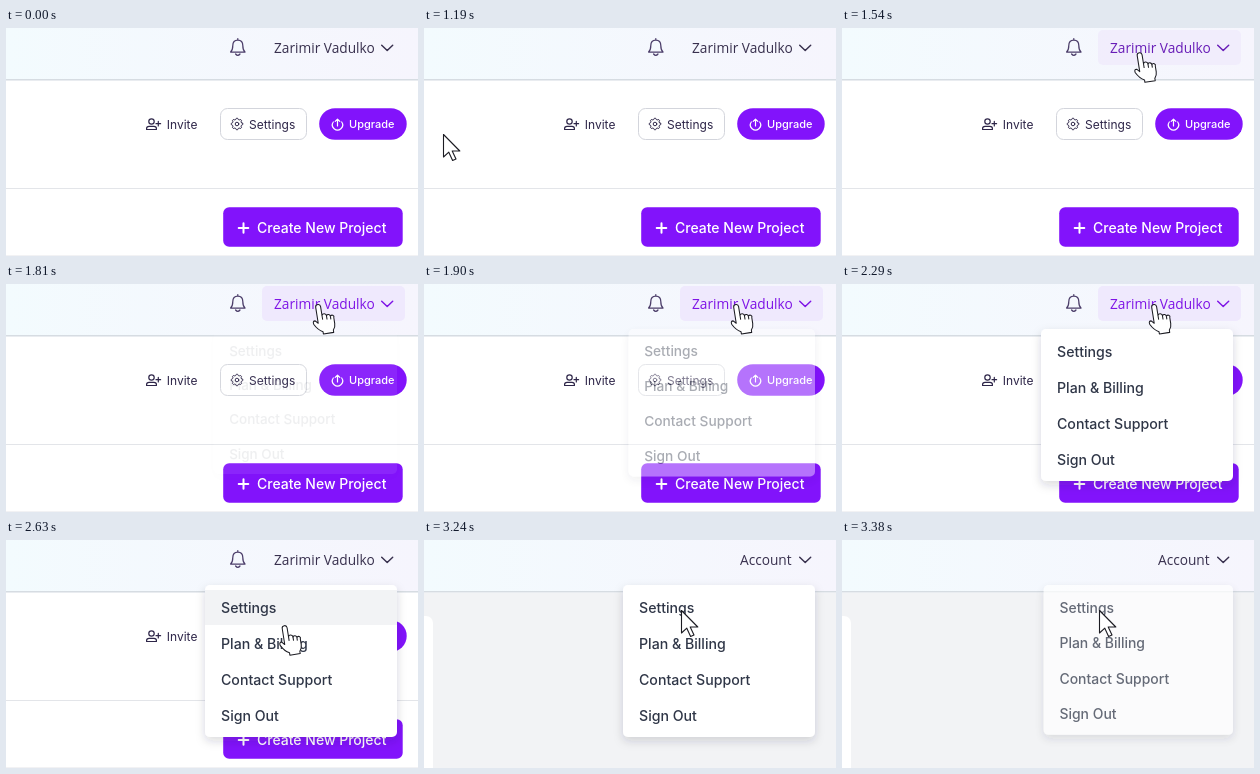
An HTML page that plays this animation: 412x228 px, repeating every 3.45 s.

```html
<!DOCTYPE html>
<html lang="en">
<head>
<meta charset="utf-8">
<title>Account menu</title>
<style>
  html, body { margin: 0; width: 100%; height: 100%; overflow: hidden; background: #fff; }
  svg { display: block; width: 412px; height: 228px; }
  text { font-family: Inter, Roboto, sans-serif; }
  .small { font-size: 12px; font-weight: 400; fill: #2d2548; }
  .strong { font-size: 14px; font-weight: 500; }
  #items { font-size: 14.15px; font-weight: 530; }
  .account { font-family: "Open Sans", "Noto Sans", sans-serif; font-size: 13.7px; }
  .line { fill: none; stroke-linecap: round; stroke-linejoin: round; }
</style>
</head>
<body>
<svg viewBox="0 0 412 228">
  <defs>
    <linearGradient id="sky">
      <stop offset="0" stop-color="#f3fbfe"/>
      <stop offset="1" stop-color="#f6f5fd"/>
    </linearGradient>
    <filter id="lift" x="-15%" y="-15%" width="130%" height="135%">
      <feDropShadow dx="0" dy="4" stdDeviation="5" flood-color="#1f2937" flood-opacity=".17"/>
    </filter>
  </defs>

  <g id="projectPage">
    <rect width="412" height="228" fill="#fff"/>
    <path d="M0 160.5H412" stroke="#e3e5e9"/>
    <path d="M0 227.5H412" stroke="#f2f2f4"/>
    <g class="line" stroke="#2d2548" stroke-width="1.2">
      <circle cx="145.5" cy="93.5" r="2.7"/>
      <path d="M140.6 101.5V100.5Q140.6 98.4 143 98.4H148Q150.4 98.4 150.4 100.5V101.5ZM152.3 93.4V98M150 95.7H154.6"/>
    </g>
    <text class="small" x="160.8" y="101">Invite</text>
    <rect x="214.5" y="80.5" width="86" height="31" rx="7" fill="#fff" stroke="#d3d5dc"/>
    <g class="line" stroke="#2d2548" stroke-width="1">
      <path id="gear"/>
      <circle cx="231" cy="96" r="1.8"/>
    </g>
    <text class="small" x="243" y="101">Settings</text>
    <rect x="313.2" y="80.2" width="87.5" height="31.6" rx="15.8" fill="#8213fb"/>
    <path class="line" stroke="#fff" stroke-width="1.2"
      d="M327.3 94A5.1 5.1 0 1 0 335.7 94M331.5 98V91.2M329.2 93.4L331.5 91.1L333.8 93.4"/>
    <text x="343" y="100" font-size="11" font-weight="500" fill="#fff">Upgrade</text>
    <rect x="217.2" y="179.2" width="179.5" height="39.5" rx="6" fill="#8213fb"/>
    <path d="M232.7 200H242.3M237.5 195.2V204.8" stroke="#fff" stroke-width="2" stroke-linecap="round"/>
    <text class="strong" x="251" y="205" fill="#fff">Create New Project</text>
  </g>

  <g id="accountPage">
    <rect width="412" height="228" fill="#f2f3f5"/>
    <rect x="-20" y="76" width="29" height="170" rx="7" fill="#fff"/>
  </g>

  <rect y="51" width="412" height="2" fill="#e9ecf0"/>
  <rect width="412" height="51" fill="url(#sky)"/>
  <path d="M0 51.5H412" stroke="#d6dce2"/>
  <path id="bell" class="line" stroke="#4b3d69" stroke-width="1.25"
    d="M224.6 24Q226.8 22 226.8 17.5Q226.8 12 231.8 12Q236.8 12 236.8 17.5Q236.8 22 239 24ZM231.8 12V10.6M229.6 26Q231.8 28.8 234 26"/>
  <rect id="buttonGlow" x="256" y="2" width="143" height="35" rx="5" fill="#efe9fd"/>
  <text id="label" class="account" y="25"></text>
  <path id="chevron" class="line" stroke-width="1.45" d="M375.7 17.2L381.2 22.6L386.7 17.2"/>

  <g id="menu">
    <rect x="199" y="45" width="192" height="152" rx="5" fill="#fff" filter="url(#lift)"/>
    <rect id="rowGlow" x="199" y="50" width="192" height="35" fill="#f2f3f5"/>
    <g id="items" fill="#2f3647"></g>
  </g>

  <g id="cursor" fill="#fff" stroke="#1b1b22" stroke-width="1.1" stroke-linejoin="round">
    <path id="arrow" d="M.5 .5V23L5.8 18.2L9.6 26.4L13 24.9L9.2 17H16.8Z"/>
    <g id="hand" transform="translate(-1 2) rotate(-9) scale(.95)">
      <path d="M-2.6 1A2.6 2.6 0 0 1 2.6 1V10.5A2.4 2.4 0 0 1 7.2 11.5A2.2 2.2 0 0 1 11.2 12.8A1.9 1.9 0 0 1 14.5 14.8V21Q14.5 25 12 27.5V30H1V27.5Q-4 25 -7.5 18.2Q-8.2 14.6 -5.4 15L-2.6 18Z"/>
      <path fill="none" d="M2.6 10.5V15M7.2 11.5V15.5M11.2 12.8V16"/>
    </g>
  </g>
</svg>
<script>
const LOOP = 3450;
const el = id => document.getElementById(id);
const clamp = v => Math.min(1, Math.max(0, v));
const ramp = (t, from, to) => clamp((t - from) / (to - from));
const smooth = u => u * u * (3 - 2 * u);
const mix = (a, b, u) => a + (b - a) * u;
const show = (id, on) => el(id).setAttribute('display', on ? 'inline' : 'none');
const fade = (id, v) => el(id).setAttribute('opacity', v);
const mixColor = (a, b, u) => `rgb(${a.map((v, i) => Math.round(mix(v, b[i], u)))})`;

// The screen updates in bursts, with still holds between them.
const burst = start => Array.from({ length: 8 }, (_, i) => start + 70 * i);
const ticks = [0, ...burst(1190), 1810, 1900, 1980, 2040, 2090, 2160, 2230, 2290,
  ...burst(2350), 3240, 3310, 3380];

const INK = [56, 48, 78], PURPLE = [126, 20, 230];
const START = [19, 106], BUTTON = [313, 20], BEND = [286, 118], ROW = [257, 70];

['Settings', 'Plan & Billing', 'Contact Support', 'Sign Out'].forEach((name, i) => {
  const item = document.createElementNS('http://www.w3.org/2000/svg', 'text');
  item.setAttribute('x', 215);
  item.setAttribute('y', 73 + 36 * i);
  item.textContent = name;
  el('items').append(item);
});

const teeth = Array.from({ length: 32 }, (_, i) => {
  const r = i % 4 < 2 ? 5.8 : 4.6, a = (i - .5) * Math.PI / 16;
  return `${(231 + r * Math.cos(a)).toFixed(2)} ${(96 + r * Math.sin(a)).toFixed(2)}`;
});
el('gear').setAttribute('d', `M${teeth.join('L')}Z`);

function cursorAt(t) {
  if (t < 2350) {
    const u = 1 - (1 - ramp(t, 1190, 1680)) ** 2.4;
    return START.map((v, i) => mix(v, BUTTON[i], u));
  }
  const s = smooth(ramp(t, 2350, 2840));
  return BUTTON.map((v, i) => mix(mix(v, BEND[i], s), mix(BEND[i], ROW[i], s), s));
}

function menuAt(t) {
  if (t < 1810) return 0;
  if (t < 3240) return .5 - .5 * Math.cos(Math.PI * ramp(t, 1750, 2090));
  return 1 - .28 * ramp(t, 3240, 3380) ** 1.5;
}

function render(time) {
  const t = ticks.findLast(tick => tick <= time);
  const leaving = t >= 3240;
  show('projectPage', !leaving);
  show('bell', !leaving);
  show('accountPage', leaving);

  const hover = ramp(t, 1430, 1590) * (1 - ramp(t, 2420, 2600));
  const color = mixColor(INK, PURPLE, hover);
  fade('buttonGlow', hover);
  el('label').textContent = leaving ? 'Account' : 'Zarimir Vadulko';
  el('label').setAttribute('x', leaving ? 316 : 268);
  el('label').setAttribute('fill', color);
  el('chevron').setAttribute('stroke', color);

  const open = menuAt(t);
  show('menu', open > 0);
  fade('menu', open);
  el('menu').setAttribute('transform',
    `translate(391 45) scale(${mix(.95, 1, open)}) translate(-391 -45)`);
  fade('rowGlow', leaving ? 0 : ramp(t, 2430, 2570));

  const [x, y] = cursorAt(t);
  const pointing = t >= 1470 && !leaving;
  show('cursor', t >= 1190);
  show('arrow', !pointing);
  show('hand', pointing);
  el('cursor').setAttribute('transform', `translate(${x.toFixed(1)} ${y.toFixed(1)})`);
}

const began = performance.now();
function loop() {
  render((performance.now() - began) % LOOP);
  requestAnimationFrame(loop);
}
loop();
</script>
</body>
</html>
```
